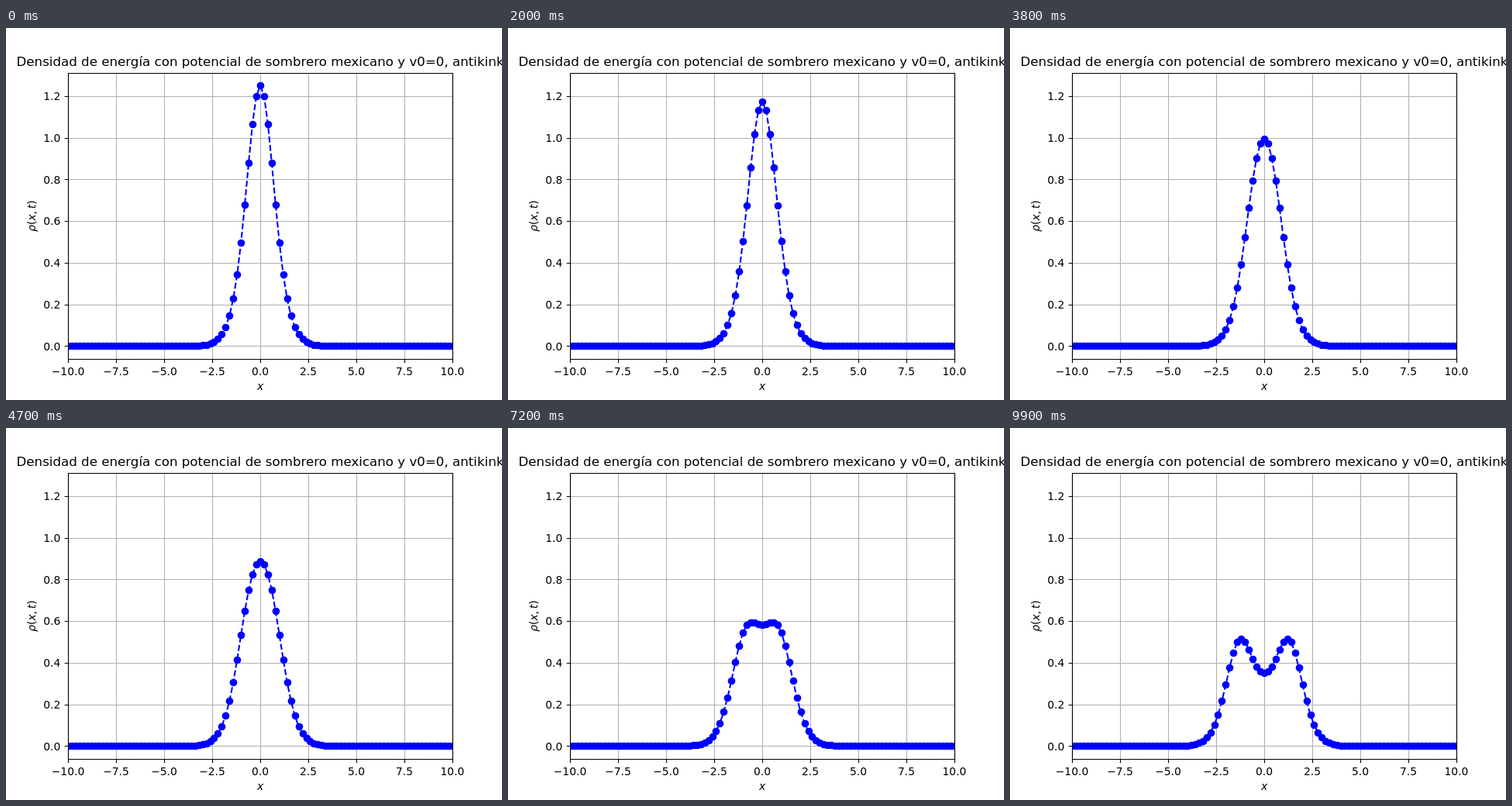
These frames come from a looping animation (640x480 px, 10 s). An HTML page:

```html
<!DOCTYPE html>
<html lang="es">
<head>
<meta charset="utf-8">
<style>
  html, body { margin: 0; width: 100%; height: 100%; overflow: hidden; background: #fff; }
  svg { display: block; font: 13.89px "DejaVu Sans", sans-serif; }
  path { fill: none; stroke-width: 1.11; }
  .mid { text-anchor: middle; }
  .end { text-anchor: end; }
  .it { font-style: oblique; }
</style>
</head>
<body>
<svg width="640" height="480" viewBox="0 0 640 480">
  <clipPath id="box"><rect x="80" y="57.6" width="496" height="369.6"/></clipPath>
  <path id="grid" stroke="#b0b0b0"/>
  <g clip-path="url(#box)">
    <path id="line" stroke="#00f" style="stroke-width:2.083" stroke-dasharray="7.71 3.33" stroke-linejoin="round"/>
    <path id="dots" stroke="#00f" style="stroke-width:9.72" stroke-linecap="round"/>
  </g>
  <path id="ticks" stroke="#000"/>
  <path stroke="#000" d="M80.5 58.5H576.5V427.5H80.5Z"/>
  <g id="labels"></g>
  <text class="mid" x="328" y="49.3" font-size="16.67">Densidad de energía con potencial de sombrero mexicano y v0=0, antikink</text>
  <text class="mid it" x="328" y="467">x</text>
  <text class="mid" transform="translate(38 242.6) rotate(-90)"><tspan class="it">ρ</tspan>(<tspan class="it">x</tspan>,<tspan class="it" dx="2.7">t</tspan>)</text>
</svg>
<script>
const $ = id => document.getElementById(id);
const px = x => 328 + 24.8 * x;
const py = y => 410.4 - 268.8 * y;
const snap = v => Math.floor(v + 0.5) + 0.5;

// Axes
let grid = '', ticks = '', labels = '';
for (let i = -4; i <= 4; i++) {
  const v = i * 2.5, x = snap(px(v));
  grid += `M${x} 58V427`;
  ticks += `M${x} 427.5v4.86`;
  labels += `<text class="mid" x="${px(v)}" y="448">${v.toFixed(1).replace('-', '−')}</text>`;
}
for (let i = 0; i <= 6; i++) {
  const v = i * 0.2, y = snap(py(v));
  grid += `M80 ${y}H576`;
  ticks += `M80.5 ${y}h-4.86`;
  labels += `<text class="end" x="70.3" y="${py(v) + 5.2}">${v.toFixed(1)}</text>`;
}
$('grid').setAttribute('d', grid);
$('ticks').setAttribute('d', ticks);
$('labels').innerHTML = labels;

// Field equation phi_tt = phi_xx - phi + phi^3, starting at rest from a tanh profile
const N = 1001, DX = 0.02, DT = 0.01, STEPS = 100, SKIP = 10;
const force = (f, i) =>
  (f[i + 1] - 2 * f[i] + f[i - 1]) / DX ** 2 - f[i] + f[i] ** 3;

function density(f) {
  const out = [];
  for (let i = 0; i < N; i += SKIP) {
    const edge = i === 0 || i === N - 1;
    const slope = edge ? 0 : (f[i + 1] - f[i - 1]) / DX;
    out.push(slope ** 2 / 2 + (f[i] ** 2 - 1) ** 2 / 4);
  }
  return out;
}

let now = Array.from({ length: N }, (_, i) => Math.tanh((i * DX - 10) / Math.SQRT2));
let past = now.map((p, i) => i % (N - 1) ? p + force(now, i) * DT ** 2 / 2 : p);
const frames = [];
for (let n = 0; n < STEPS; n++) {
  frames.push(density(now));
  const next = now.map((p, i) =>
    i % (N - 1) ? 2 * p - past[i] + force(now, i) * DT ** 2 : p);
  past = now;
  now = next;
}

let shown = -1;
function draw() {
  const n = Math.floor(performance.now() / 100) % STEPS;
  if (n !== shown) {
    shown = n;
    const pts = frames[n].map((r, i) => [px(i * DX * SKIP - 10), py(r)]);
    $('line').setAttribute('d', 'M' + pts.map(p => p.map(v => v.toFixed(2))).join('L'));
    $('dots').setAttribute('d', pts.map(p => `M${snap(p[0])} ${snap(p[1])}h0`).join(''));
  }
  requestAnimationFrame(draw);
}
draw();
</script>
</body>
</html>
```
